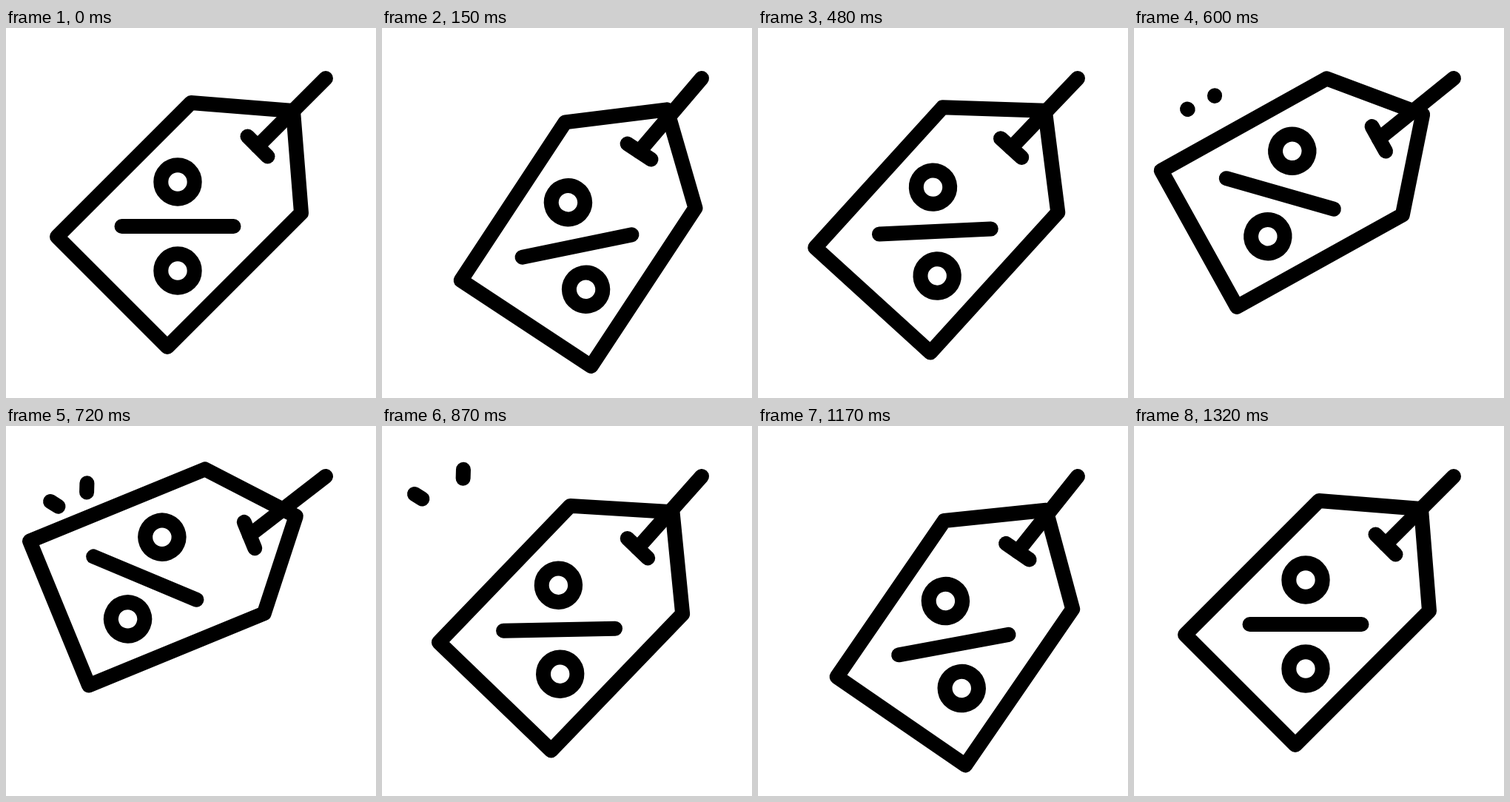
An HTML page that plays this animation: 500 px wide and 500 px high, repeating every 1.8 s.

```html
<!DOCTYPE html>
<html lang="en">
<head>
<meta charset="utf-8">
<title>Swinging price tag</title>
<style>
  html, body { margin: 0; width: 100%; height: 100%; overflow: hidden; background: #fff; }
  svg { display: block; width: 100%; height: 100%; }
  svg * { fill: none; stroke: #000; stroke-width: 20; stroke-linecap: round; stroke-linejoin: round; }
</style>
</head>
<body>
<svg viewBox="0 0 500 500">
  <line class="spark"/>
  <line class="spark"/>
  <g id="cord">
    <path d="M432 68L340 160"/>
    <g id="tag">
      <path d="M326.5 146.5L353.5 173.5"/>
      <path d="M69 282L250 101L388 112L399 250L218 431Z"/>
      <path d="M156.5 268H307.5"/>
      <circle cx="232" cy="208" r="22.7"/>
      <circle cx="232" cy="328" r="22.7"/>
    </g>
  </g>
</svg>
<script>
  const LOOP = 1800, STEP = 30;

  // Swing keys: step, cord angle, tag angle (both absolute, in degrees)
  const swing = [
    [0, 0, 0], [10, -9.1, -23.2], [11, -8.7, -22.6], [16, -1.3, -2.7],
    [18, 2.8, 6.5], [22.5, 8.3, 23.1], [24, 7.3, 22.7], [29, -3.3, -1.1],
    [34, -11.3, -20.9], [36, -10, -19.5], [39, -6.4, -10.5], [44, 0, 0]
  ];

  // Each spark runs outwards from its first point to its second
  const sparks = [[72.7, 110, 43.3, 91.5], [109, 92, 110, 58]];

  const cord = document.getElementById('cord');
  const tag = document.getElementById('tag');
  const lines = document.querySelectorAll('.spark');

  const mix = (a, b, p) => a + (b - a) * p;

  function ease(from, to, x) {
    const p = Math.min(1, Math.max(0, (x - from) / (to - from)));
    return p * p * (3 - 2 * p);
  }

  const secant = (i, c) =>
    (swing[i + 1][c] - swing[i][c]) / (swing[i + 1][0] - swing[i][0]);

  // Harmonic mean of neighbouring secants: flat at turning points
  function slope(i, c) {
    if (i === 0 || i === swing.length - 1) return 0;
    const a = secant(i - 1, c), b = secant(i, c);
    return a * b > 0 ? 2 * a * b / (a + b) : 0;
  }

  function angle(x, c) {
    const i = swing.findIndex(k => k[0] > x) - 1;
    if (i < 0) return 0;
    const [a, b] = [swing[i], swing[i + 1]];
    const h = b[0] - a[0], p = (x - a[0]) / h, q = 1 - p;
    return a[c] * q * q * (1 + 2 * p) + b[c] * p * p * (3 - 2 * p)
      + h * p * q * (slope(i, c) * q - slope(i + 1, c) * p);
  }

  function draw(x) {
    const s = angle(x, 1), a = angle(x, 2);
    cord.setAttribute('transform', `rotate(${s} 432 68)`);
    tag.setAttribute('transform', `rotate(${a - s} 340 160)`);

    const head = ease(19, 30, x), tail = ease(22, 34, x);
    sparks.forEach(([x1, y1, x2, y2], i) => {
      const line = lines[i];
      line.style.display = head > tail ? '' : 'none';
      line.setAttribute('x1', mix(x1, x2, tail));
      line.setAttribute('y1', mix(y1, y2, tail));
      line.setAttribute('x2', mix(x1, x2, head));
      line.setAttribute('y2', mix(y1, y2, head));
    });
  }

  const start = performance.now();

  function tick() {
    draw(Math.floor((performance.now() - start) % LOOP / STEP));
    requestAnimationFrame(tick);
  }
  tick();
</script>
</body>
</html>
```
